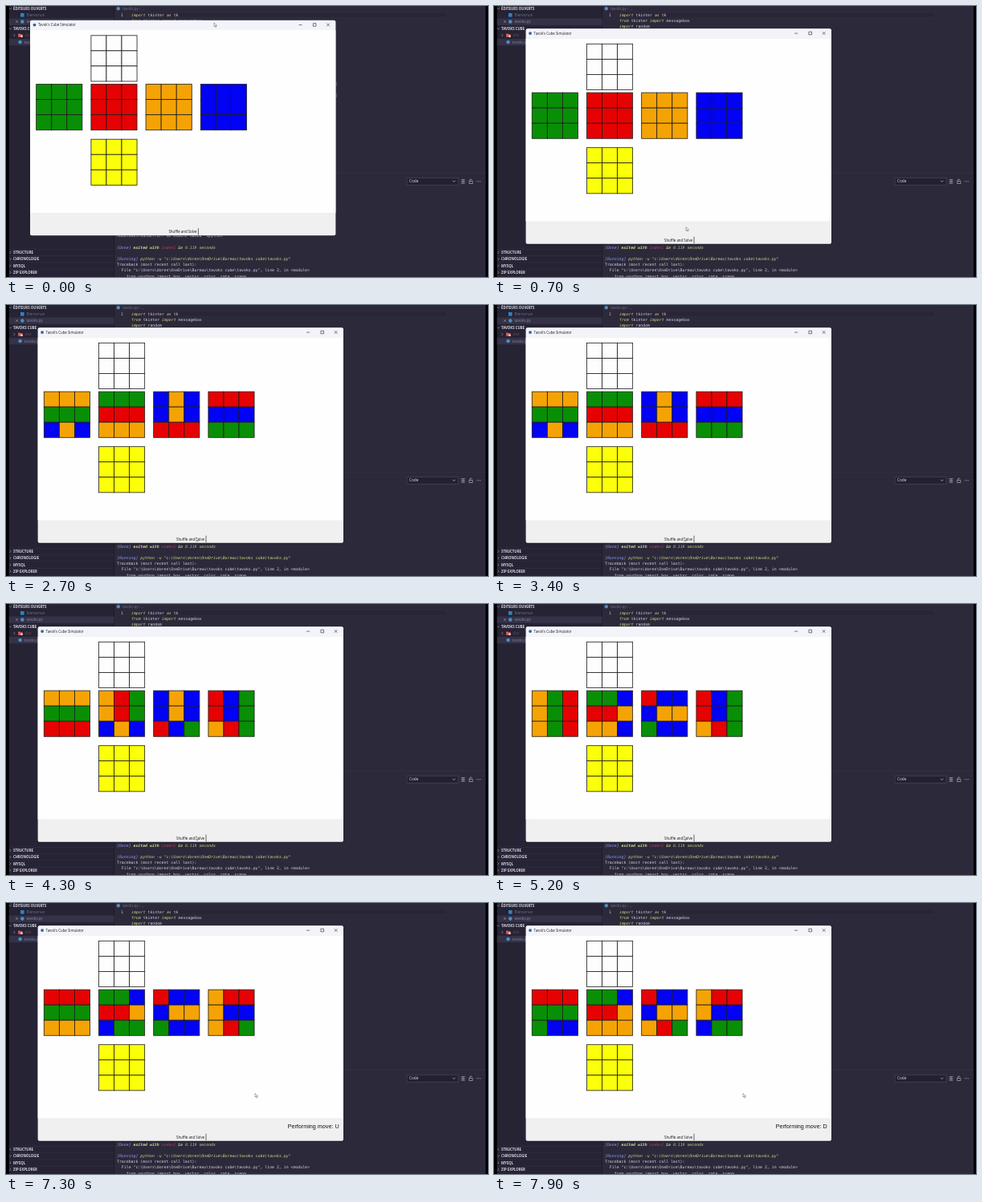
Animation, 600 px wide and 338 px high, one loop 8 s. Source, as an HTML page:

```html
<!DOCTYPE html>
<html lang="fr">
<head>
<meta charset="utf-8">
<title>Cube Simulator</title>
<style>
html, body { margin: 0; width: 100%; height: 100%; overflow: hidden; background: #000; }
svg { display: block; width: 100vw; height: 100vh; }
text { white-space: pre; }
.ui { font-family: "Open Sans", "Noto Sans", sans-serif; }
.mono { font-family: "DejaVu Sans Mono", "Liberation Mono", monospace; font-size: 4.87px; fill: #d4d2de; }
.i { font-style: italic; }
.b { font-weight: bold; }
</style>
</head>
<body>
<svg id="stage" viewBox="0 0 600 338"></svg>
<script>
const LOOP = 8000;
const CELL = 19.05;
const COLORS = { W: '#fdfdfd', G: '#098f06', R: '#e60202', O: '#f5a304', B: '#0202f4', Y: '#fbff0a' };
const LIME = '#d6d98a', BLUE = '#8f9cf0', ROSE = '#b5435a';

const stage = document.getElementById('stage');

function add(parent, tag, attrs, content) {
  const node = document.createElementNS('http://www.w3.org/2000/svg', tag);
  for (const key in attrs) node.setAttribute(key, attrs[key]);
  if (content !== undefined) node.textContent = content;
  parent.appendChild(node);
  return node;
}
const rect = (parent, x, y, width, height, fill, more = {}) =>
  add(parent, 'rect', { x, y, width, height, fill, ...more });
const path = (parent, d, stroke, width = 0.6, fill = 'none') =>
  add(parent, 'path', { d, stroke, 'stroke-width': width, fill });
const dot = (parent, cx, cy, r, fill) => add(parent, 'circle', { cx, cy, r, fill });
const label = (parent, x, y, size, fill, content, more = {}) =>
  add(parent, 'text', { class: 'ui', x, y, 'font-size': size, fill, ...more }, content);

// Each part is [text, colour, class]
function codeLine(x, y, ...parts) {
  const line = add(stage, 'text', { class: 'mono', x, y });
  for (const [content, fill = '#d4d2de', cls = ''] of parts) {
    add(line, 'tspan', { fill, class: cls }, content);
  }
  return line;
}

function drawSidebar() {
  rect(stage, 3.5, 0, 131, 338, '#252334');
  rect(stage, 3.5, 15.5, 131, 8.4, '#353247');
  rect(stage, 3.5, 41, 131, 8.2, '#353247');
  const open = y => path(stage, `M4 ${y - 0.8}l1.4 1.5l1.4 -1.5`, '#c9c7d4', 0.5);
  const closed = (x, y) => path(stage, `M${x} ${y - 1.6}l1.5 1.6l-1.5 1.6`, '#c9c7d4', 0.5);
  const heading = (y, content) =>
    label(stage, 9, y + 1.7, 4.35, '#d8d6e2', content, { 'font-weight': 700 });

  open(3.2);
  heading(3.2, 'ÉDITEURS OUVERTS');
  rect(stage, 18, 9, 4.6, 4.6, '#2f83c9');
  label(stage, 25.5, 13, 4.6, '#6f6d80', 'Bienvenue');
  path(stage, 'M12.2 18.2l2.6 2.6m0 -2.6l-2.6 2.6', '#c9c7d4', 0.5);
  dot(stage, 20.3, 19.6, 2.3, '#4a8fbf');
  label(stage, 25.5, 21.3, 4.6, '#8f8da4', 'tavoks.py');
  open(28.4);
  heading(28.4, 'TAVOKS CUBE');
  closed(9.5, 36.5);
  path(stage, 'M15.2 34.4h2l0.8 0.8h2.6v3.6h-5.4z', 'none', 0, '#e0605f');
  dot(stage, 19.6, 37.8, 1.3, '#f0d9d9');
  label(stage, 22.5, 38.1, 4.6, '#6e4658', '.dist');
  dot(stage, 17.6, 45, 2.3, '#4a8fbf');
  label(stage, 22.5, 46.7, 4.6, '#8280a0', 'tavoks.py');

  ['STRUCTURE', 'CHRONOLOGIE', 'MYSQL', 'ZIP EXPLORER'].forEach((name, i) => {
    const y = 307.4 + i * 8.25;
    rect(stage, 3.5, y - 4.2, 131, 0.4, '#3b384d');
    closed(4.5, y);
    heading(y, name);
  });
}

function drawEditor() {
  rect(stage, 134.5, 0, 462.5, 338, '#2c293b');
  dot(stage, 139.8, 3.2, 2.2, '#4a8fbf');
  label(stage, 145, 5, 4.5, '#77758a', 'tavoks.py › ...');
  rect(stage, 155, 8, 393, 6.6, '#282536', { stroke: '#353245', 'stroke-width': 0.4 });
  codeLine(143, 12.7, ['1', '#c9c7d4']);
  codeLine(156, 12.7, ['import', LIME, 'i'], [' tkinter '], ['as', LIME, 'i'], [' tk']);
  codeLine(156, 19.8, ['from', LIME, 'i'], [' tkinter '], ['import', LIME, 'i'], [' messagebox']);
  codeLine(156, 26.9, ['import', LIME, 'i'], [' random']);
  for (const y of [98.5, 112.5]) codeLine(410.2, y, [']', '#8b899c']);

  rect(stage, 134.5, 208.5, 462.5, 0.5, '#36334a');
  rect(stage, 499, 214.2, 64, 9, '#232130', { stroke: '#55536a', 'stroke-width': 0.5 });
  label(stage, 502, 220.4, 4.7, '#e2e0ea', 'Code');
  path(stage, 'M556 217.8l1.7 1.7l1.7 -1.7', '#e2e0ea', 0.6);
  path(stage, 'M566.6 216.5h4.8m-4.8 1.6h4.8m-4.8 1.6h4.8m-4.8 1.6h4.8m-2.4 -4.8v4.8', '#aaa8b8', 0.6);
  path(stage, 'M576.6 218.5h4.2v3h-4.2zM577.4 218.5v-1a1.3 1.3 0 0 1 2.6 -0.4', '#c9c7d4', 0.6);
  [586.3, 588.3, 590.3].forEach(x => dot(stage, x, 218.8, 0.5, '#c9c7d4'));
}

function drawTerminal() {
  const file = '"c:\\Users\\doren\\OneDrive\\Bureau\\tavoks cube\\tavoks.py"';
  codeLine(138, 288.2, ["ModuleNotFoundError: No module named 'vpython'"]);
  codeLine(138, 302.7, ['[Done]', BLUE, 'i'], [' exited with ', LIME, 'i b'], ['code=1', ROSE, 'i'],
    [' in ', LIME, 'i b'], ['0.119', '#a8c97a', 'i'], [' seconds', LIME, 'i']);
  codeLine(138, 317.3, ['[Running]', BLUE, 'i'], [' python -u ', LIME, 'i'], [file, LIME, 'i']);
  codeLine(138, 324.4, ['Traceback (most recent call last):']);
  codeLine(138, 331.4, [`  File ${file}, line 2, in <module>`]);
  codeLine(138, 338.5, ['    from vpython import box, vector, color, rate, scene']);
}

// Net layout, relative to the window
const FACES = { U: ['W', 75.9, 19], L: ['G', 7.7, 79.8], F: ['R', 75.9, 79.8],
                R: ['O', 144.1, 79.8], B: ['B', 212.3, 79.8], D: ['Y', 75.9, 148.4] };

function drawWindow() {
  const win = add(stage, 'g', {});
  rect(win, -0.4, -0.2, 381.3, 269.4, '#15131f', { rx: 2.4, opacity: 0.6 });
  rect(win, 0, 0, 380.4, 268.5, '#f0f0f0', { rx: 2 });
  rect(win, 0, 12.2, 380.4, 228, '#fefefe');
  rect(win, 0.3, 0.3, 379.8, 12, '#f2f4fa', { rx: 2 });
  dot(win, 5.5, 5.8, 1.9, '#3f5f93');
  label(win, 10, 7.4, 4.36, '#1c1c1c', "Tavok's Cube Simulator");
  path(win, 'M334.5 5.8h4M352.3 3.9h3.6v3.6h-3.6zM369.2 3.9l3.6 3.6m0 -3.6l-3.6 3.6', '#222', 0.6);
  label(win, 172.4, 265.6, 4.36, '#111', 'Shuffle and Solve');
  path(win, 'M209.4 259.4v8.4', '#555', 0.9);

  const cells = {};
  for (const [name, [color, x, y]] of Object.entries(FACES)) {
    cells[name] = Array.from({ length: 9 }, (_, i) =>
      rect(win, x + i % 3 * CELL, y + Math.floor(i / 3) * CELL, CELL, CELL, COLORS[color],
        { stroke: '#1b1b1b', 'stroke-width': 0.8 }));
  }
  const status = label(win, 375, 252.9, 7.2, '#111', '',
    { 'text-anchor': 'end', style: 'font-family:"Liberation Sans",Arial,sans-serif' });
  return { win, cells, status };
}

const MOVES = [
  [1500, 'U'], [1850, 'D'], [2200, 'R'], [2700, 'D'], [2980, "R'"], [3190, 'R'],
  [3690, 'F'], [3990, "B'"], [4290, 'D'], [4680, "F'"], [4900, 'R'], [5180, "L'"],
  [5400, "L'"], [5600, 'D'], [5980, 'B'], [6190, "D'"], [6450, "U'"],
  [6750, 'U', true], [7400, 'D', true]
];

function rotateFace(cube, face) {
  cube[face] = [6, 3, 0, 7, 4, 1, 8, 5, 2].map(i => cube[face][i]);
}

function shiftRow(cube, start) {
  const ring = ['L', 'F', 'B', 'R'];
  const rows = ring.map(face => cube[face].slice(start, start + 3));
  ring.forEach((face, i) => cube[face].splice(start, 3, ...rows[(i + 3) % 4]));
}

function turn(cube, move) {
  const face = move[0];
  for (let n = move[1] ? 3 : 1; n > 0; n--) {
    if (face === 'U') shiftRow(cube, 0);
    else if (face === 'D') shiftRow(cube, 6);
    else rotateFace(cube, face);
  }
}

function cubeAt(t) {
  const cube = {};
  for (const face in FACES) cube[face] = Array(9).fill(FACES[face][0]);
  let message = '';
  for (const [time, move, solving] of MOVES) {
    if (time > t) break;
    turn(cube, move);
    if (solving) message = `Performing move: ${move}`;
  }
  return { cube, message };
}

// Keys are [time, x, y]
const WINDOW_PATH = [[0, 30, 17.8], [350, 39.6, 28.3]];
const POINTER_PATH = [[0, 259, 21], [350, 268.6, 31.5], [680, 239, 275.5], [1000, 236.5, 290],
                      [6600, 236, 289.5], [7300, 310, 237.5]];

function along(keys, t) {
  const next = keys.findIndex(key => key[0] > t);
  if (next < 0) return keys[keys.length - 1].slice(1);
  const [t0, x0, y0] = keys[next - 1], [t1, x1, y1] = keys[next];
  const u = (t - t0) / (t1 - t0), k = u * u * (3 - 2 * u);
  return [x0 + (x1 - x0) * k, y0 + (y1 - y0) * k];
}

const place = (node, [x, y]) => node.setAttribute('transform', `translate(${x} ${y})`);

drawEditor();
drawSidebar();
drawTerminal();
const { win, cells, status } = drawWindow();
const pointer = add(stage, 'g', {});
path(pointer, 'M0 0v4.6l1.1 -1l0.8 1.8l0.9 -0.4l-0.8 -1.7h1.5z', '#444', 0.45, '#fff');
const busy = add(pointer, 'circle',
  { cx: 0.5, cy: 0.3, r: 1.8, fill: '#e8f4ff', stroke: '#2b86c8', 'stroke-width': 0.9 });
rect(stage, 0, 0, 3.5, 338, '#000');
rect(stage, 597, 0, 3, 338, '#000');

function render(t) {
  place(win, along(WINDOW_PATH, t));
  place(pointer, along(POINTER_PATH, t));
  busy.setAttribute('visibility', t >= 6350 && t < 6650 ? 'visible' : 'hidden');
  const { cube, message } = cubeAt(t);
  for (const face in cells) {
    cells[face].forEach((cell, i) => cell.setAttribute('fill', COLORS[cube[face][i]]));
  }
  status.textContent = message;
}

const begin = performance.now();
function tick() {
  render((performance.now() - begin) % LOOP);
  requestAnimationFrame(tick);
}
tick();
</script>
</body>
</html>
```
